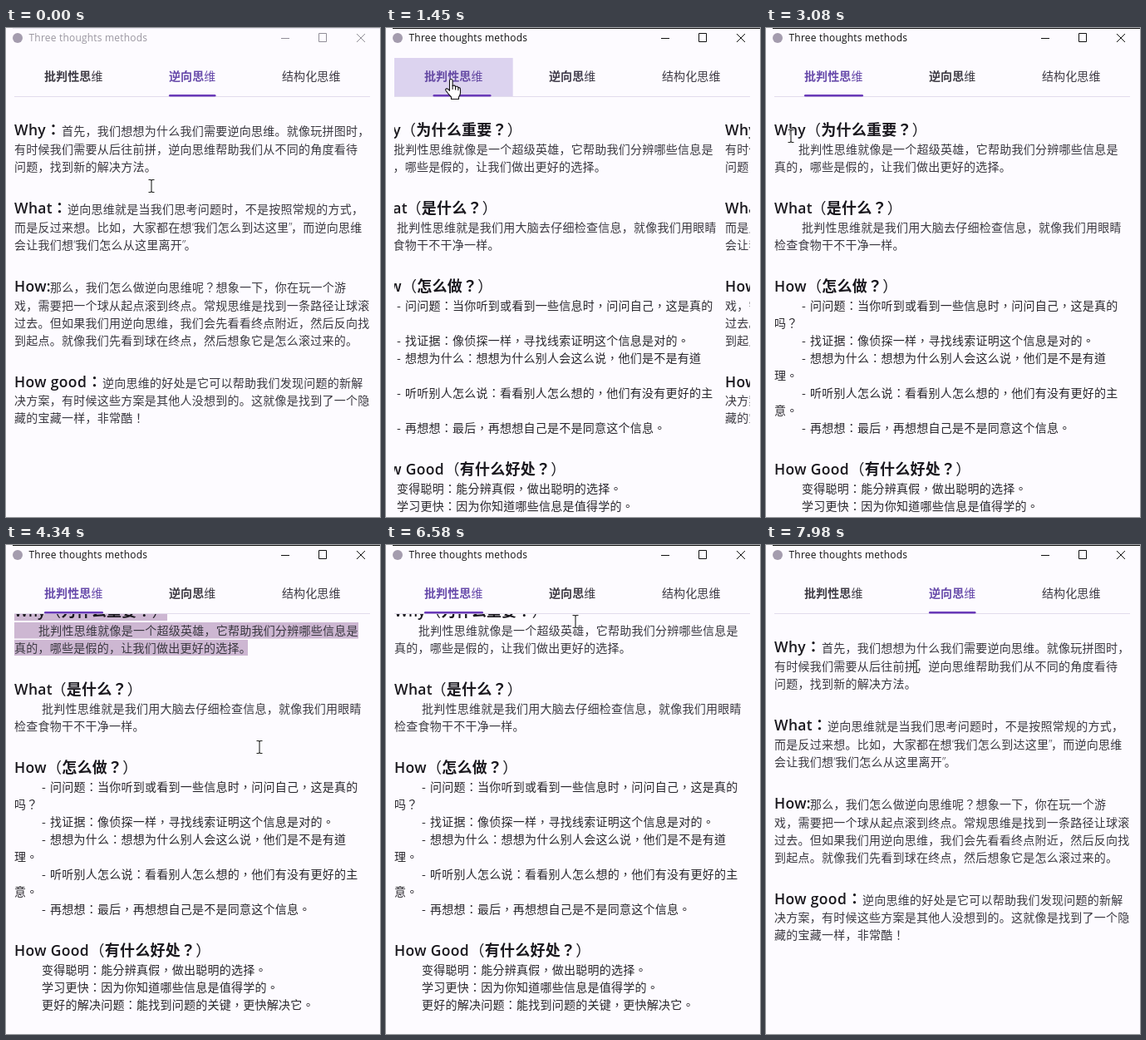
Animation of 450 by 588 pixels, one loop 8000 ms. Source, as an HTML page:

```html
<!DOCTYPE html>
<html lang="zh-Hans">
<head>
<meta charset="utf-8">
<title>Three thoughts methods</title>
<style>
html, body { margin: 0; width: 100%; height: 100%; overflow: hidden; background: #fdfbff; }
svg { display: block; position: absolute; left: 0; top: 0; }
text { white-space: pre; text-spacing-trim: space-all; fill: #28262c; }
.s, .t { font-size: 14px; font-weight: 350; letter-spacing: .25px; }
.s, .tab { font-family: "Noto Sans CJK SC", "Noto Sans CJK", sans-serif; }
.s { fill: #3a3840; }
.t, .H, .mid { font-family: "Noto Sans CJK TC", "Noto Sans CJK", sans-serif; }
.H { font-size: 18px; letter-spacing: .25px; font-weight: 600; fill: #1a181e; }
.h { font: 600 17.5px "Open Sans", "Noto Sans", sans-serif; letter-spacing: .35px; fill: #1a181e; }
.q { font-family: "Open Sans", sans-serif; letter-spacing: -1.6px; }
.tab { font-size: 14px; letter-spacing: .1px; font-weight: 600; }
.thin { font-weight: 350; }
#title { font: 12px "Open Sans", "Noto Sans", sans-serif; letter-spacing: .2px; }
</style>
</head>
<body>
<svg width="450" height="588" viewBox="0 0 450 588">
  <defs><clipPath id="view"><rect x="10" y="83" width="428" height="505"/></clipPath></defs>
  <rect width="450" height="588" fill="#fdfbff"/>
  <rect id="edge" x="8" width="442" height="1"/>
  <circle cx="14" cy="12" r="6" fill="#a49cae"/>
  <text id="title" x="27.5" y="16">Three thoughts methods</text>
  <path id="buttons" d="M331 12.5h10M376.500 6.500h9v10h-9zM422 7l10 10M432 7l-10 10" fill="none"/>
  <rect id="hover" y="36" width="142.7" height="46" fill="#dcd3ef"/>
  <rect x="10" y="82" width="428" height="1" fill="#e2dcec"/>
  <rect id="bar" y="80" height="2.6" rx="1.3" fill="#6a3ab8"/>
  <g id="tabs"></g>
  <g clip-path="url(#view)">
    <g id="page1"><g id="marks" fill="#cdb7d2"></g></g>
    <g id="page2"></g>
  </g>
  <g id="beam" fill="none">
    <path d="M-3.5-7.5h2.5l1 1 1-1h2.5M0-6.5v13M-3.5 7.5h2.5l1-1 1 1h2.5" stroke="#fff" stroke-width="2.6"/>
    <path d="M-3.5-7.5h2.5l1 1 1-1h2.5M0-6.5v13M-3.5 7.5h2.5l1-1 1 1h2.5" stroke="#222" stroke-width="1.1"/>
  </g>
  <g id="hand" stroke="#111" stroke-width="1.1" stroke-linejoin="round" stroke-linecap="round">
    <path fill="#fff" d="M-2 2Q-2 0-.2 0T1.6 2V8Q4.4 6.8 5 9Q7.8 8 8.4 10.2Q11 9.6 11 12.5V16.5Q11 19 9 21.5V24H0V21.5Q-3.5 18-6.5 13.8Q-7.5 11.8-5.5 11.4Q-4 11.2-2 13.8Z"/>
    <path fill="none" d="M1.6 8v4M5 9v3.5M8.4 10.2v3"/>
  </g>
</svg>
<script>
const $ = id => document.getElementById(id);
const set = (el, attrs) => { for (const k in attrs) el.setAttribute(k, attrs[k]); };
function add(parent, tag, attrs, html = '') {
  const el = document.createElementNS('http://www.w3.org/2000/svg', tag);
  set(el, attrs);
  el.innerHTML = html;
  parent.append(el);
  return el;
}

// Each row: x, baseline, text, class (h/H heading, s/t body)
const PAGE1 = [
  [10, 129, 'Why', 'h'], [48, 129, '（为什么重要？）', 'H'],
  [39, 151, '批判性思维就像是一个超级英雄，它帮助我们分辨哪些信息是', 's'],
  [10, 172, '真的，哪些是假的，让我们做出更好的选择。', 's'],
  [10, 223, 'What', 'h'], [54.5, 223, '（是什么？）', 'H'],
  [43, 245, '批判性思维就是我们用大脑去仔细检查信息，就像我们用眼睛', 's'],
  [10, 266, '检查食物干不干净一样。', 's'],
  [10, 317, 'How', 'h'], [49, 317, '（怎么做？）', 'H'],
  [43, 339, '-', 't'], [53, 339, '问问题：当你听到或看到一些信息时，问问自己，这是真的', 't'],
  [10, 360, '吗？', 't'],
  [43, 381, '-', 't'], [53, 381, '找证据：像侦探一样，寻找线索证明这个信息是对的。', 't'],
  [43, 402, '-', 't'], [53, 402, '想想为什么：想想为什么别人会这么说，他们是不是有道', 't'],
  [10, 423, '理。', 't'],
  [43, 444, '-', 't'], [53, 444, '听听别人怎么说：看看别人怎么想的，他们有没有更好的主', 't'],
  [10, 465, '意。', 't'],
  [43, 486, '-', 't'], [53, 486, '再想想：最后，再想想自己是不是同意这个信息。', 't'],
  [10, 537, 'How Good', 'h'], [100.5, 537, '（有什么好处？）', 'H'],
  [43, 559, '变得聪明：能分辨真假，做出聪明的选择。', 't'],
  [43, 580, '学习更快：因为你知道哪些信息是值得学的。', 't'],
  [43, 601, '更好的解决问题：能找到问题的关键，更快解决它。', 't']
];
const PAGE2 = [
  [10, 129, 'Why', 'h'], [48, 129, '：', 'H'],
  [67, 129, '首先，我们想想为什么我们需要逆向思维。就像玩拼图时，', 's'],
  [10, 151, '有时候我们需要从后往前拼，逆向思维帮助我们从不同的角度看待', 's'],
  [10, 172, '问题，找到新的解决方法。', 's'],
  [10, 223, 'What', 'h'], [55.5, 223, '：', 'H'],
  [74, 223, '逆向思维就是当我们思考问题时，不是按照常规的方式，', 's'],
  [10, 245, '而是反过来想。比如，大家都在想“我们怎么到达这里”，而逆向思维', 's'],
  [10, 266, '会让我们想“我们怎么从这里离开”。', 's'],
  [10, 317, 'How:', 'h'],
  [53, 317, '那么，我们怎么做逆向思维呢？想象一下，你在玩一个游', 's'],
  [10, 339, '戏，需要把一个球从起点滚到终点。常规思维是找到一条路径让球滚', 's'],
  [10, 360, '过去。但如果我们用逆向思维，我们会先看看终点附近，然后反向找', 's'],
  [10, 381, '到起点。就像我们先看到球在终点，然后想象它是怎么滚过来的。', 's'],
  [10, 432, 'How good', 'h'], [97.5, 432, '：', 'H'],
  [116, 432, '逆向思维的好处是它可以帮助我们发现问题的新解', 's'],
  [10, 453, '决方案，有时候这些方案是其他人没想到的。这就像是找到了一个隐', 's'],
  [10, 474, '藏的宝藏一样，非常酷！', 's']
];
const span = (cls, lang = 'zh-Hans') => m => `<tspan class="${cls}" lang="${lang}">${m}</tspan>`;
function fill(page, rows) {
  for (const [x, y, str, cls] of rows) {
    // Traditional glyph forms centre their punctuation
    const lang = cls === 's' ? 'zh-Hans' : 'zh-Hant';
    let html = str.replace(/[“”]/g, span('q'));
    if (cls === 's') html = html.replace(/[？！]/g, span('mid', 'zh-Hant'));
    if (cls === 'H') html = html.replace(/[（）]/g, span('thin'));
    add(page, 'text', { x, y, class: cls, lang }, html);
  }
}
fill($('page1'), PAGE1);
fill($('page2'), PAGE2);

const tabs = [[46, '批判性思维'], [196, '逆向思维'], [332, '结构化思维']].map(([x, str], i) =>
  add($('tabs'), 'text', { x, y: 63, class: i < 2 ? 'tab' : 'tab thin' }, str.replace('维', span('thin'))));

// Selected lines: top, height, right end
const LINES = [[113, 21, 194], [136, 19.5, 424], [157, 19, 291]];
const marks = LINES.map(([y, height]) => add($('marks'), 'rect', { x: 10, y, height }));

// Pointer stops: time, x, y
const PATH = [
  [0, 175, 190], [560, 175, 190], [1130, 78.5, 61.5], [1560, 78.5, 61.5], [2190, 150, 176],
  [2240, 150, 176], [2330, 152, 178], [2520, 152, 178], [3080, 30, 130], [3180, 23, 130],
  [3320, 23, 130], [3420, 12, 126], [3920, 298, 168], [4110, 303, 200], [4160, 303, 200],
  [4340, 305, 243], [4950, 320, 420], [5350, 200, 330], [5790, 120, 540],
  [6200, 280, 380], [6580, 228, 92], [6760, 220.5, 72], [7180, 220.5, 72],
  [7420, 205, 122], [7840, 205, 122], [7980, 181, 146], [8000, 181, 146]
];
const LOOP = 8000, PAGE = 428;
const clamp = v => Math.max(0, Math.min(1, v));
const mix = (a, b, k) => a + (b - a) * k;
const smooth = k => k * k * (3 - 2 * k);
const ramp = (t, start, span) => clamp((t - start) / span);

// cubic-bezier(.25, .1, .25, 1)
function ease(x) {
  let lo = 0, hi = 1, u = .5;
  for (let i = 0; i < 20; i++) {
    u = (lo + hi) / 2;
    const bx = .75 * u * (1 - u) + u ** 3;
    if (bx < x) lo = u; else hi = u;
  }
  return x <= 0 ? 0 : x >= 1 ? 1 : .3 * u * (1 - u) ** 2 + 3 * u * u * (1 - u) + u ** 3;
}
function pointer(t) {
  const i = Math.max(1, PATH.findIndex(p => p[0] > t));
  const [a, b] = [PATH[i - 1], PATH[i]];
  const k = smooth(ramp(t, a[0], b[0] - a[0]));
  return [mix(a[1], b[1], k), mix(a[2], b[2], k)];
}
function tint(k) {
  const from = [62, 59, 68], to = [103, 74, 170];
  return `rgb(${from.map((c, i) => Math.round(mix(c, to[i], k)))})`;
}

function draw(t) {
  const active = t >= 1200;
  $('title').style.fill = active ? '#111' : '#9a96a0';
  set($('buttons'), { stroke: active ? '#111' : '#918e98' });
  set($('edge'), { fill: active ? '#111' : '#e8e5ee' });

  // 1 = second tab, 0 = first tab
  const p = 1 - ease(ramp(t, 1248, 300)) + ease(ramp(t, 6884, 300));
  const scroll = 43 * smooth(ramp(t, 4170, 110));
  set($('page1'), { transform: `translate(${-p * PAGE} ${-scroll})` });
  set($('page2'), { transform: `translate(${(1 - p) * PAGE} 0)` });
  set($('bar'), { x: 46 + 150 * p, width: mix(71, 56.5, p) });
  [1 - p, p, 0].forEach((k, i) => { tabs[i].style.fill = tint(k); });

  const [x, y] = pointer(t);
  const onTab = y > 36 && y < 82;
  const tab = Math.floor((x - 10) / 142.7);
  set($('hover'), { x: 10 + tab * 142.7, visibility: onTab ? 'visible' : 'hidden' });
  for (const [id, on] of [['hand', onTab], ['beam', !onTab]])
    set($(id), { transform: `translate(${x} ${y})`, visibility: on ? 'visible' : 'hidden' });

  const selecting = t >= 3420 && t < 5300;
  const row = t > 4110 || y > 178 ? 3 : y > 156 ? 2 : y > 135 ? 1 : 0;
  LINES.forEach(([, , end], i) => {
    const right = i < row ? end : i === row ? Math.min(end, x) : 10;
    set(marks[i], { width: selecting ? Math.max(0, right - 10) : 0 });
  });
}

const start = performance.now();
function tick() {
  draw((performance.now() - start) % LOOP);
  requestAnimationFrame(tick);
}
tick();
</script>
</body>
</html>
```
